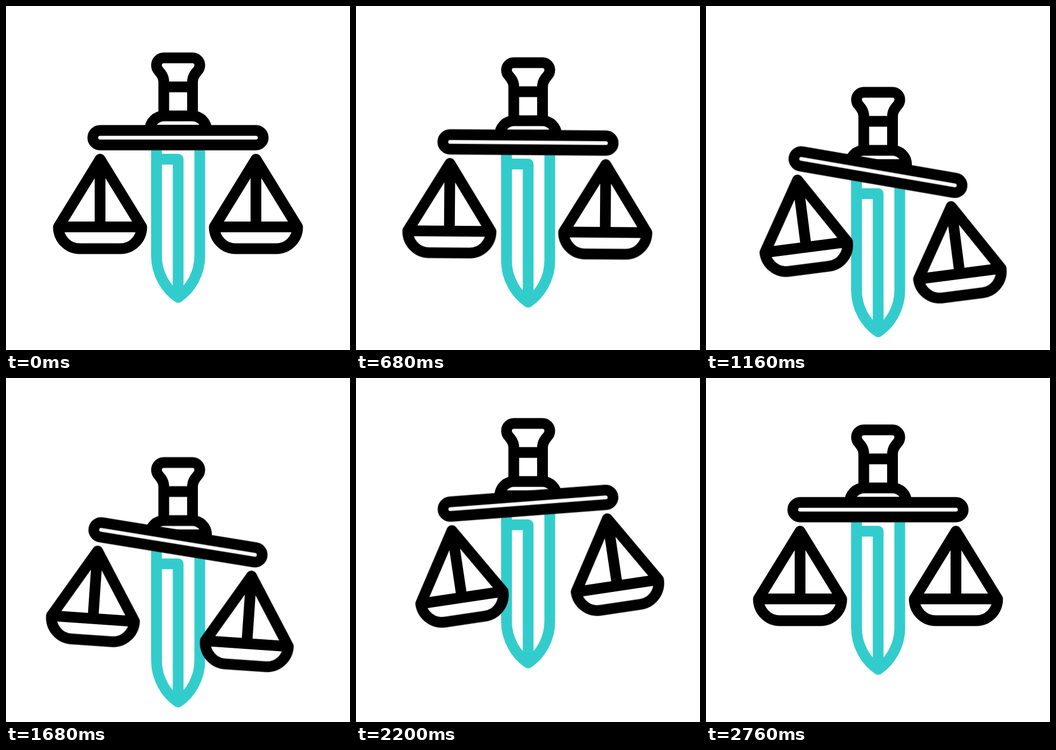
An HTML page for the animation above (3000 ms loop, 640 by 640 pixels).

```html
<!DOCTYPE html>
<html lang="en">
<head>
<meta charset="utf-8">
<title>Sword and scales</title>
<style>
  html, body { margin: 0; width: 100%; height: 100%; overflow: hidden; background: #fff; }
  svg { display: block; width: 100%; height: 100%; }
  .line { fill: none; stroke: #000; stroke-width: 20; stroke-linejoin: round; }
  .blade { stroke: #3cc; }
  .pan { stroke-linecap: round; }

  .sword, .beam, .swing { animation: 3s infinite; }
  .sword { animation-name: bob; animation-timing-function: cubic-bezier(.58, 0, .155, 1); }
  .beam, .swing { animation-timing-function: cubic-bezier(.5, 0, .5, 1); }
  .beam { animation-name: tilt; transform-origin: 320px 245px; }
  .swing { animation-name: swing; transform-origin: 175px 285px; }

  @keyframes bob {
    0%, 6.667% { transform: translateY(0); }
    13.333% { transform: translateY(-12px); }
    41.333%, 52% { transform: translateY(64.4px); }
    74% { transform: translateY(-12px); }
    92%, 100% { transform: translateY(0); }
  }
  @keyframes tilt {
    0%, 18.9% { transform: rotate(0deg); }
    41.333%, 52% { transform: rotate(10deg); }
    74% { transform: rotate(-4.35deg); }
    92%, 100% { transform: rotate(0deg); }
  }
  @keyframes swing {
    0%, 22.667% { transform: rotate(0deg); }
    44.5% { transform: rotate(-19.5deg); }
    55.333% { transform: rotate(-5.3deg); }
    74% { transform: rotate(-4.15deg); }
    92%, 100% { transform: rotate(0deg); }
  }
</style>
</head>
<body>
<svg viewBox="0 0 640 640">
  <defs>
    <path id="pan" class="line pan" d="M97.5 411L175 285L252.5 411ZM175 285V411M97.5 411A39.5 40.5 0 0 0 137 451.5H213A39.5 40.5 0 0 0 252.5 411"/>
  </defs>
  <g class="sword">
    <path class="line blade" d="M280 245V465C280 497 297 527 320.3 542C343.5 527 360.5 497 360.5 465V245M280 285H320.3V542"/>
    <path class="line" d="M293.5 204V141C293.5 131 288 125 284.5 121C281 117.5 280 113.5 280 110A13.5 13.5 0 0 1 293.5 96.5H347A13.5 13.5 0 0 1 360.5 110C360.5 113.5 359.5 117.5 356 121C352.5 125 347 131 347 141V204M293.5 150.5H347"/>
    <path class="line" d="M267.5 231A26.5 26.5 0 0 1 294 204.5H346.6A26.5 26.5 0 0 1 373.1 231Z"/>
    <g class="beam">
      <g class="swing"><use href="#pan"/></g>
      <g transform="translate(290 0)"><g class="swing"><use href="#pan"/></g></g>
      <rect class="line" style="fill:#fff" x="161.5" y="231.5" width="317" height="27" rx="13.5"/>
    </g>
  </g>
</svg>
</body>
</html>
```
